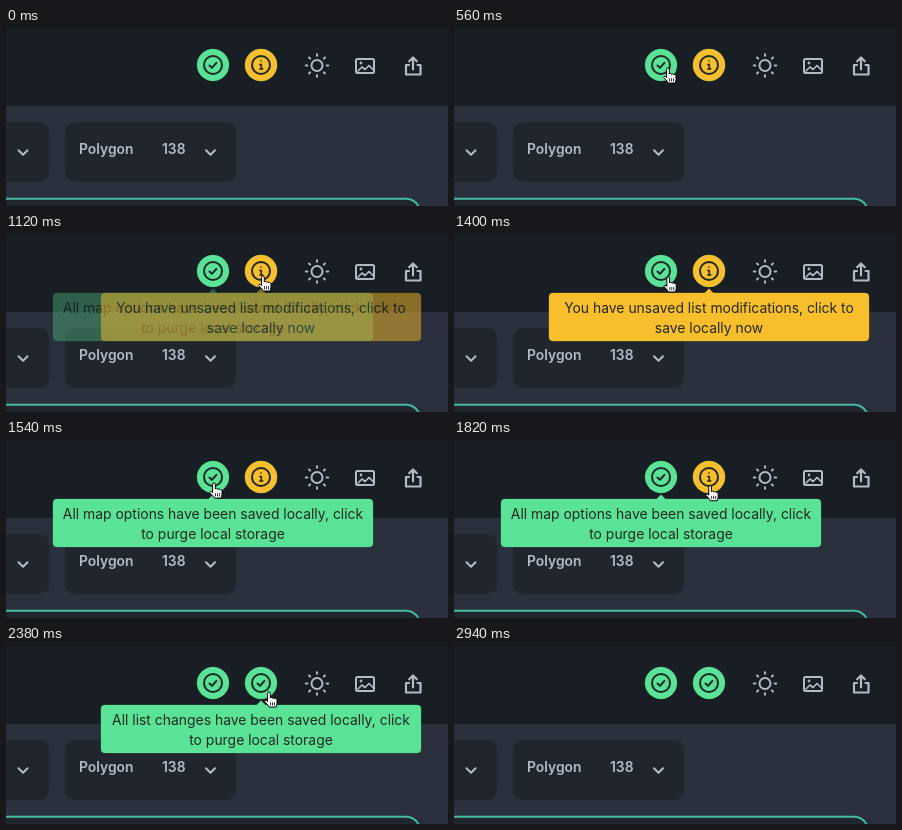
Animation, 442 px wide and 178 px high, one loop 3290 ms. Source, as an HTML page:

```html
<!DOCTYPE html>
<html lang="en">
<head>
<meta charset="utf-8">
<title>Saved settings toolbar</title>
<style>
  html, body { margin: 0; width: 100%; height: 100%; overflow: hidden; background: #191d24; }
  svg { display: block; font: 13.91px Inter, "Open Sans", sans-serif; }
  .line, .mark { fill: none; stroke: #b4bbc8; stroke-width: 2; stroke-linecap: round; stroke-linejoin: round; }
  .mark { stroke: #1b2824; }
  .label { fill: #b4bbc8; font-weight: 600; font-size: 13.85px; }
  .ok { fill: #5ae297; stroke: #2f8a5c; }
  .warn { fill: #f8be2c; stroke: #95731f; }
  .ok, .warn { stroke-opacity: .55; paint-order: stroke; }
  .tip text { fill: #222a22; text-anchor: middle; }
</style>
</head>
<body>
<svg width="442" height="178" viewBox="0 0 442 178">
  <defs>
    <g id="saved">
      <circle class="ok" r="16"/>
      <g class="mark"><circle r="9"/><path d="M-3.5.5l2.400 2.400 4.500-5"/></g>
    </g>
    <path id="chevron" class="line" d="M-4.500-2.200L0 2.300 4.500-2.200"/>
  </defs>

  <rect y="78" width="442" height="100" fill="#2a303c"/>
  <g fill="#20252e">
    <rect x="-40" y="94" width="83" height="60" rx="10"/>
    <rect x="59" y="94" width="171" height="60" rx="10"/>
    <path d="M-5 170.700H400a14 14 0 0 1 14 14H-5z" stroke="#45b9a2" stroke-width="2"/>
  </g>
  <use href="#chevron" x="17" y="124.500"/>
  <use href="#chevron" x="204.500" y="124.500"/>
  <text class="label" x="73" y="126">Polygon</text>
  <text class="label" x="156" y="126">138</text>

  <g class="line">
    <circle cx="311" cy="37.500" r="5.500"/>
    <g id="rays" transform="translate(311 37.500)"></g>
    <rect x="350" y="31" width="18" height="14" rx="1.500"/>
    <path d="M352 43l4-4 3 2.500 4-4 4 4" stroke-width="1.700"/>
    <circle cx="355" cy="35" r=".8" stroke-width="1.200"/>
    <path d="M403 37H400V46.500H414.500V37H411.500M407 41.500V29.500M403.200 33.300l3.800-3.800 3.800 3.800" stroke-width="2.200"/>
  </g>

  <use href="#saved" x="207" y="37"/>
  <use href="#saved" x="255" y="37"/>
  <g id="unsaved" transform="translate(255 37)">
    <circle class="warn" r="16"/>
    <g class="mark"><circle r="9"/><path d="M-1.200-.5H.3V4M-1.200 4H1.800M0-4v.1" stroke-width="1.600"/></g>
  </g>

  <g id="tips"></g>

  <g id="cursor">
    <path id="arrow" fill="#000" stroke="#fff" stroke-width="1.200" stroke-linejoin="round"
      d="M0 0V15.500L3.600 12.200 6 17.800 8.600 16.700 6.200 11.200H11z"/>
    <g id="hand" transform="translate(-5 -.4)" fill="#fff" stroke="#000" stroke-linejoin="round" stroke-linecap="round">
      <path d="M3.600 9.500V1.700a1.300 1.300 0 0 1 2.700 0V6.400c.4-.9 2.200-.8 2.400.4.5-.8 2.100-.6 2.300.5.6-.6 2-.2 2 .9v3.600q0 1.800-1 3.700H5.200Q4 13 1 10.300c-1-1 .6-2.400 2.600-.8z"/>
      <path d="M6.500 11v2.500M8.500 11v2.500M10.500 11v2.500" stroke-width=".8"/>
    </g>
  </g>
</svg>
<script>
const LOOP = 3290, STEP = 70;
const $ = id => document.getElementById(id);
const ramp = (t, from, to) => Math.max(0, Math.min(1, (t - from) / (to - from)));
const pulse = (t, a, b, c, d) => ramp(t, a, b) - ramp(t, c, d);
const easeOut = k => 1 - (1 - k) ** 3;

for (let a = 0; a < 360; a += 45)
  $("rays").innerHTML += `<path d="M0-9.700v-1.500" transform="rotate(${a})"/>`;

// Each tooltip hangs below the button centred at x.
function addTip(x, kind, first, second) {
  $("tips").insertAdjacentHTML("beforeend", `<g class="tip" transform="translate(${x})">
    <rect class="${kind}" x="-160" y="59" width="320" height="48" rx="4"/>
    <path class="${kind}" stroke="none" style="stroke:none" d="M-5 59.500L0 54.500 5 59.500z"/>
    <text y="78.500">${first}</text><text y="98.500">${second}</text></g>`);
  return $("tips").lastElementChild;
}
const mapTip = addTip(207, "ok", "All map options have been saved locally, click", "to purge local storage");
const unsavedTip = addTip(255, "warn", "You have unsaved list modifications, click to", "save locally now");
const listTip = addTip(255, "ok", "All list changes have been saved locally, click", "to purge local storage");

// The pointer glides from button to button, easing into each stop.
const entry = { x: 262, y: 125 };
const moves = [
  { from: 0, to: 560, x: 214, y: 40 },
  { from: 945, to: 1190, x: 258, y: 42 },
  { from: 1260, to: 1540, x: 208, y: 43 },
  { from: 1680, to: 1960, x: 263, y: 46 },
  { from: 2730, to: 2940, x: 290, y: 190 }
];

function pointer(t) {
  let { x, y } = entry;
  for (const m of moves) {
    const k = easeOut(ramp(t, m.from, m.to));
    x += (m.x - x) * k;
    y += (m.y - y) * k;
  }
  return [x, y];
}

function draw(now) {
  const t = Math.floor(now % LOOP / STEP) * STEP;
  const [x, y] = pointer(t);
  const over = [207, 255].some(cx => Math.hypot(x - cx, y - 37) < 16);
  const saved = ramp(t, 2170, 2380);

  $("cursor").setAttribute("transform", `translate(${x} ${y})`);
  $("cursor").style.display = t >= 70 && t < 2940 ? "" : "none";
  $("hand").style.display = over ? "" : "none";
  $("arrow").style.display = over ? "none" : "";

  $("unsaved").style.opacity = 1 - saved;
  mapTip.style.opacity = pulse(t, 630, 840, 980, 1190) + pulse(t, 1400, 1540, 1820, 1960);
  unsavedTip.style.opacity = saved === 1 ? 0 : pulse(t, 1050, 1190, 1400, 1540) + ramp(t, 1820, 1960);
  listTip.style.opacity = saved - ramp(t, 2730, 2940);
  requestAnimationFrame(draw);
}
requestAnimationFrame(draw);
</script>
</body>
</html>
```
